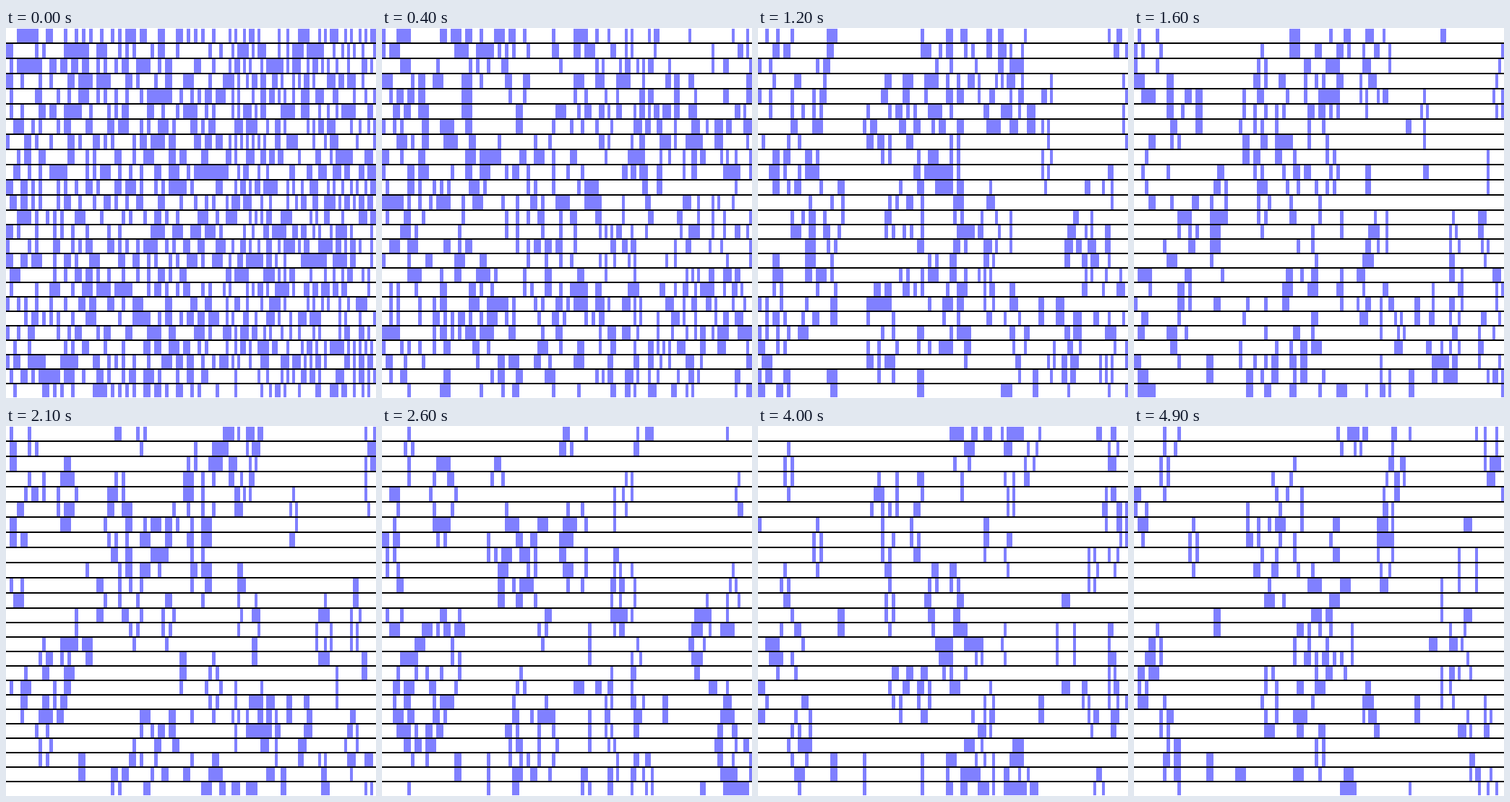
A matplotlib script that plays this animation: 512x512 px, repeating every 5000 ms.

```python
import numpy as np
import matplotlib.pyplot as plt
from matplotlib.animation import FuncAnimation

SIZE, DPI = 512, 100
ROWS, COLS = 25, 113
GENERATIONS, STEP_MS = 50, 100
DENSITY, SEED = 0.44, 5
WHITE, BLACK, BLUE = (255, 255, 255), (0, 0, 0), (128, 128, 255)


def split(total, parts):
    """Divide total pixels into whole parts, the larger ones first."""
    small, extra = divmod(total, parts)
    return np.where(np.arange(parts) < extra, small + 1, small)


def evolve(cells):
    """One step of Conway-style life on a torus."""
    near = sum(np.roll(cells, (dy, dx), (0, 1))
               for dy in (-1, 0, 1) for dx in (-1, 0, 1)) - cells
    return ((near == 3) | ((near == 2) & (cells == 1))).astype(int)


def run():
    rng = np.random.default_rng(SEED)
    history = [(rng.random((ROWS, COLS)) < DENSITY).astype(int)]
    while len(history) < GENERATIONS:
        history.append(evolve(history[-1]))
    return history


heights, widths = split(SIZE, ROWS), split(SIZE, COLS)
lines = np.cumsum(heights)[:-1]
palette = np.array([WHITE, BLUE], dtype=np.uint8)
history = run()


def picture(gen):
    pixels = np.repeat(np.repeat(history[gen], heights, axis=0), widths, axis=1)
    image = palette[pixels]
    image[[0, -1]] = WHITE
    image[lines - 1] = BLACK
    image[lines] = BLACK
    return image


fig = plt.figure(figsize=(SIZE / DPI, SIZE / DPI), dpi=DPI)
ax = fig.add_axes([0, 0, 1, 1])
ax.axis("off")
view = ax.imshow(picture(0), interpolation="nearest", aspect="auto")


def update(gen):
    view.set_data(picture(gen))
    return (view,)


anim = FuncAnimation(fig, update, frames=GENERATIONS, interval=STEP_MS,
                     repeat=True, repeat_delay=0)
plt.show()
```
